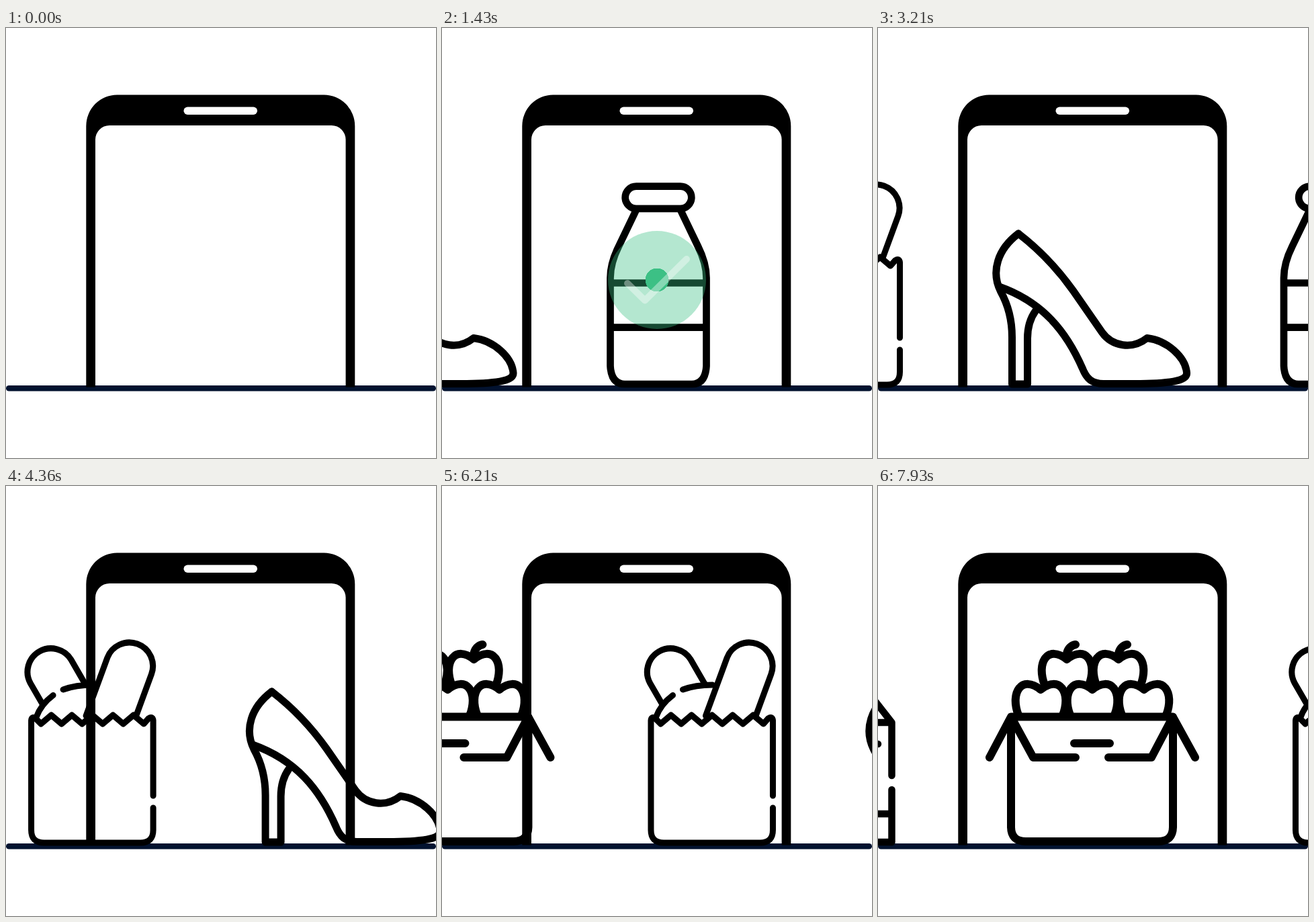
Write an HTML page that moves like this. It is 640 px wide and 640 px high and loops after 8000 ms.

```html
<!DOCTYPE html>
<html lang="en">
<head>
<meta charset="utf-8">
<title>Product scan</title>
<style>
  html, body { margin: 0; width: 100%; height: 100%; overflow: hidden; background: #fff; }
  svg { display: block; width: 100%; height: 100%; }
  .line { fill: none; stroke: #000; stroke-linecap: round; stroke-linejoin: round; }
</style>
</head>
<body>
<svg viewBox="0 0 640 640">
  <defs>
    <path id="apple" d="M-33 38C-46 4 -28 -22 0 0C28 -22 46 4 33 38"/>
    <path id="stem" d="M0 -9Q3 -20 13 -22"/>
  </defs>
  <path d="M4.300 536.200H635.700" stroke="#02122f" stroke-width="8.600" stroke-linecap="round"/>

  <!-- Each product sits at minus the belt offset that centres it. -->
  <g id="belt" class="line">
    <g stroke-width="10.700">
      <rect x="272.700" y="235.600" width="98.600" height="33.200" rx="16.600"/>
      <path d="M288 273L263 325Q250.500 350 250.500 372V503Q252 530 272 530H372Q392 530 393.500 503V372Q393.500 350 381 325L356 273M250.500 379.500H393.500M250.500 445.700H393.500"/>
    </g>
    <g transform="translate(-353)" stroke-width="11">
      <path d="M208.500 306C241 331 268 360 290 391L333 453C348 474 378 479 400 461.500C430 465 457 490 459 513C460 524 440 529 390 529.500H335C318 529.500 310 522 304 507C280 452 245 408 180 385"/>
      <path d="M208.500 306C178 329 167 362 182 392C192 410 199 430 199 460V530H222V462C222 445 226 432 234 421"/>
    </g>
    <g transform="translate(-542)" stroke-width="9">
      <path id="bag"/>
      <path d="M57 326L38.200 293.500A35 35 0 0 1 98.800 258.500L119 293.500M121 342L152.600 256A35 35 0 0 1 218.400 280L196 341M47 344Q54 325 72 311.500M87 303Q106 296 131 296"/>
    </g>
    <g transform="translate(-1124)" stroke-width="12">
      <path d="M198 343.500H439V507Q439 529 417 529H220Q198 529 198 507ZL166 404M200 347L231 404H294M437 347L407 404H343M439 344L472 404M292 383H345"/>
      <use href="#apple" x="242" y="303"/>
      <use href="#apple" x="319" y="303"/>
      <use href="#apple" x="396" y="303"/>
      <use href="#apple" x="281" y="258"/>
      <use href="#apple" x="358" y="258"/>
      <use href="#stem" x="281" y="258"/>
      <use href="#stem" x="358" y="258"/>
    </g>
    <path transform="translate(-1124)" stroke-width="10.500" d="M-10 313L20.500 352H-10M20.500 352V431M20.500 452V530H-10M-10 488H20.500M-10 384H0"/>
  </g>

  <path d="M119.300 534.500V146A46 46.500 0 0 1 165.300 99.500H473.300A46 46.500 0 0 1 519.300 146V534.500H505.600V166A21 21 0 0 0 484.600 145H154A21 21 0 0 0 133 166V534.500Z"/>
  <rect x="264.500" y="117.500" width="109.500" height="11.500" rx="5.750" fill="#fff"/>

  <g id="badge">
    <circle id="disc" cx="320" cy="375" r="73" fill="#3cc085"/>
    <g id="dots" fill="#3cc085"></g>
    <path id="tick" class="line" style="stroke:#fff" stroke-width="10" d="M276 380L302 405.500L364 344"/>
  </g>
</svg>
<script>
const LOOP = 8000, MOVE = 1210, SCAN = 640, DOTS = 12;
const stops = [
  { start: 0, from: -400, to: 0, scan: 1338 },
  { start: 1950, from: 0, to: 353.5, scan: 3290 },
  { start: 3938, from: 353.5, to: 734, scan: 5266 },
  { start: 5933, from: 734, to: 1124, scan: 7250 }
];
const byId = id => document.getElementById(id);
const clamp = v => Math.min(1, Math.max(0, v));
const belt = byId('belt'), badge = byId('badge'), disc = byId('disc'), tick = byId('tick');

// Paper bag with a zigzag rim
let rim = '';
for (let i = 0; i <= 10; i++) rim += `L${207 - i * 15.3} ${i % 2 ? 341 : 354}`;
byId('bag').setAttribute('d', 'M221 461V349Q220 342 214 346' + rim +
  'L46 346Q40 342 39.500 349V512Q39.500 531 58.500 531H202Q221 531 221 512V479');

const dots = Array.from({ length: DOTS }, () =>
  byId('dots').appendChild(document.createElementNS('http://www.w3.org/2000/svg', 'circle')));

// Cubic-bezier ease (.37, 0, .24, 1), solved by bisection
function ease(p) {
  let lo = 0, hi = 1;
  for (let i = 0; i < 24; i++) {
    const s = (lo + hi) / 2, u = 1 - s;
    if (3 * u * u * s * .37 + 3 * u * s * s * .24 + s * s * s < p) lo = s; else hi = s;
  }
  return lo * lo * (3 - 2 * lo);
}

function drawBadge(age) {
  const shown = age > 0 && age < SCAN;
  badge.style.display = shown ? '' : 'none';
  if (!shown) return;
  const alpha = Math.min(clamp(age / 245), clamp((SCAN - age) / 245));
  disc.setAttribute('opacity', alpha);
  tick.setAttribute('opacity', alpha);
  const spread = clamp((age - 110) / (SCAN - 110));
  const radius = 17 * clamp(age / 90) * (1 - spread) ** 4 + 5 * spread * (1 - spread);
  dots.forEach((dot, i) => {
    const angle = i * 2 * Math.PI / DOTS, reach = (i % 2 ? 135 : 145) * spread;
    dot.setAttribute('cx', 320 + reach * Math.cos(angle));
    dot.setAttribute('cy', 375 + reach * Math.sin(angle));
    dot.setAttribute('r', radius);
  });
}

function draw(time) {
  const stop = stops.findLast(s => time >= s.start);
  const offset = stop.from + (stop.to - stop.from) * ease(clamp((time - stop.start) / MOVE));
  belt.setAttribute('transform', `translate(${offset})`);
  drawBadge(time - stop.scan);
}

const begin = performance.now();
function animate() {
  draw((performance.now() - begin) % LOOP);
  requestAnimationFrame(animate);
}
animate();
</script>
</body>
</html>
```
